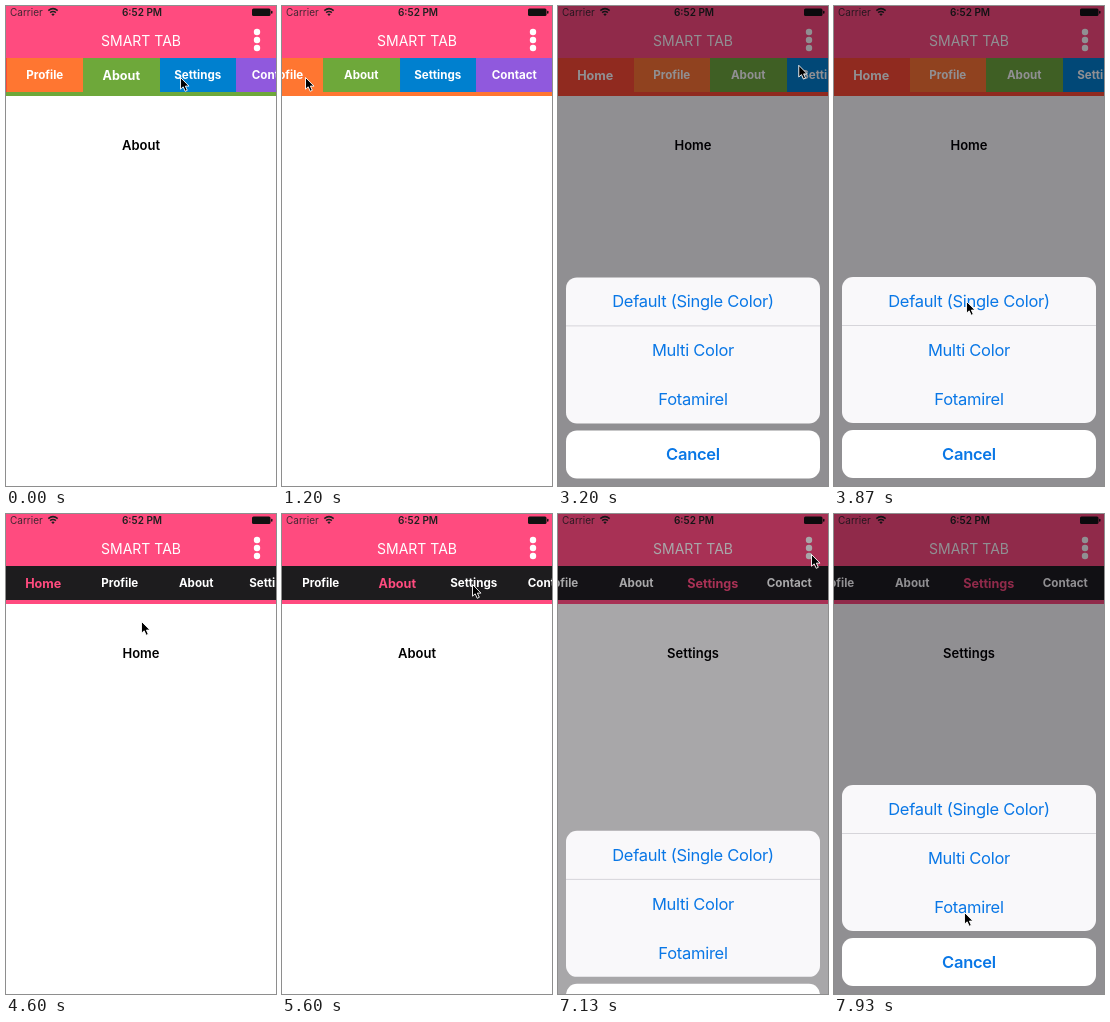
Recreate the animation shown at these times as an HTML page. Size 270 by 480 pixels, loop 8 s.

```html
<!DOCTYPE html>
<html lang="en">
<head>
<meta charset="utf-8">
<title>Smart tab</title>
<style>
  html, body { margin: 0; width: 100%; height: 100%; overflow: hidden; background: #fff; }
  #stage { position: absolute; inset: 0; overflow: hidden; font-family: Inter, Roboto, sans-serif; }
  #stage div, #stage svg { position: absolute; }
  .header { width: 100%; height: 52px; background: #ff4b7f; }
  .title { top: 25px; width: 100%; line-height: 20px; font-size: 14px; color: #fff; text-align: center; }
  .status { top: 0; line-height: 12px; font-size: 10px; color: #202020; white-space: nowrap; }
  .carrier { left: 4px; color: #442733; }
  .clock { width: 100%; left: 1px; font-weight: 600; text-align: center; }
  .strip { top: 52px; width: 100%; height: 38px; overflow: hidden; }
  .tabs { top: 0; left: 0; width: 383px; height: 34px; }
  .tab { top: 0; width: 76.5px; height: 34px; line-height: 35px; font-size: 11.6px; font-weight: 700; color: #fff; text-align: center; }
  .page { top: 129px; width: 100%; line-height: 20px; font-size: 13px; font-weight: 600; color: #000; text-align: center; }
  .dim { inset: 0; background: #040008; }
  .sheet { left: 8px; top: 271px; width: 254px; height: 201px; }
  .group { width: 100%; height: 146px; border-radius: 11px; background: #f9f8fa; }
  .choice { width: 100%; height: 49px; line-height: 49px; font-size: 16.5px; letter-spacing: -.27px; color: #0977e6; text-align: center; }
  .rule { top: 48px; width: 100%; height: 1px; background: #d6d5da; }
  .cancel { top: 153px; width: 100%; height: 48px; line-height: 48px; border-radius: 11px; background: #fff; font-weight: 600; }
  .cursor { left: 0; top: 0; width: 12px; height: 17px; overflow: visible; }
</style>
</head>
<body>
<div id="stage">
  <div class="header"></div>
  <div class="title">SMART TAB</div>
  <div class="status carrier">Carrier</div>
  <div class="status clock">6:52 PM</div>
  <svg width="270" height="52">
    <path d="M42.3 4.6Q47 .6 51.7 4.6M44.1 6.7Q47 4.3 49.9 6.7" fill="none" stroke="#202020" stroke-width="1.5"/>
    <path d="M45.3 8.2Q47 7 48.7 8.2L47 10z" fill="#202020"/>
    <rect x="246" y="2.5" width="18.5" height="7.5" rx="1.5" fill="#111"/>
    <rect x="265" y="4.7" width="1.5" height="3" rx=".7" fill="#111"/>
    <g fill="#fff"><circle cx="251" cy="26" r="3.2"/><circle cx="251" cy="34" r="3.2"/><circle cx="251" cy="42" r="3.2"/></g>
  </svg>
  <div class="strip"><div class="tabs"></div></div>
  <div class="page"></div>
  <div class="dim"></div>
  <div class="sheet">
    <div class="group">
      <div class="choice" style="top:0">Default (Single Color)</div>
      <div class="rule"></div>
      <div class="choice" style="top:49px">Multi Color</div>
      <div class="choice" style="top:98px">Fotamirel</div>
    </div>
    <div class="choice cancel">Cancel</div>
  </div>
  <svg class="cursor" viewBox="0 0 12 17">
    <path d="M.5 .5V12.2L3.2 9.8L5.2 14.3L7.3 13.3L5.4 9.1H9z" fill="#000" stroke="#fff" stroke-width=".9"/>
  </svg>
</div>
<script>
const LOOP = 8000, TAB = 76.5, MIN_SCROLL = 1, MAX_SCROLL = 113;
const PINK = '#ff4b7f', DARK = '#1d1c1e', DIM = .44;
const names = ['Home', 'Profile', 'About', 'Settings', 'Contact'];
const colors = ['#ff4a31', '#ff7631', '#6ea83a', '#0080cf', '#9059dd'];
const SINGLE_FROM = 4300;

// Tab taps: [time, tab]
const taps = [[-1000, 2], [170, 3], [1153, 1], [1900, 0], [4960, 2], [5760, 3]];
// Sheet: [opens, closes]
const sheets = [[2850, 3980], [6970, 9000]];
// Pointer: [time, x, y]
const stops = [
  [0, 174, 71], [400, 174, 71], [1050, 23, 71], [2130, 23, 71], [2700, 253, 31], [3050, 253, 31],
  [3800, 132, 295], [4060, 132, 295], [4330, 134, 190], [4600, 135, 107], [4900, 190, 70],
  [5950, 190, 70], [6500, 253, 40], [7200, 253, 40], [7900, 130, 398], [8000, 130, 398]
];

const $ = s => document.querySelector(s);
const clamp = (v, lo = 0, hi = 1) => Math.min(hi, Math.max(lo, v));
const smooth = v => v * v * (3 - 2 * v);
const easeOut = v => 1 - (1 - v) ** 3;
const mix = (a, b, k) => a + (b - a) * k;
const scrollFor = i => clamp((i - 1) * 76, MIN_SCROLL, MAX_SCROLL);

const strip = $('.strip'), tabs = $('.tabs'), page = $('.page');
const dim = $('.dim'), sheet = $('.sheet'), cursor = $('.cursor');
const labels = names.map((name, i) => {
  const tab = document.createElement('div');
  tab.className = 'tab';
  tab.textContent = name;
  tab.style.left = i * TAB + 'px';
  return tabs.appendChild(tab);
});

function drawTabs(t) {
  const n = taps.findLastIndex(([at]) => at <= t);
  const [at, active] = taps[n];
  const before = n ? taps[n - 1][1] : active;
  const move = smooth(clamp((t - at - 30) / 320));
  const single = t >= SINGLE_FROM;
  tabs.style.transform = `translateX(${-mix(scrollFor(before), scrollFor(active), move)}px)`;
  tabs.style.background = single ? DARK : 'none';
  strip.style.background = single ? PINK : colors[active];
  labels.forEach((label, i) => {
    const on = i === active;
    label.style.background = single ? 'none' : colors[i];
    label.style.color = single && on ? PINK : '#fff';
    label.style.fontSize = (on ? mix(11.6, 12.6, move) : 11.6) + 'px';
  });
  page.textContent = names[active];
  page.style.opacity = clamp((t - at - 60) / 260);
}

function drawSheet(t) {
  const [opens, closes] = sheets.findLast(([at]) => at <= t) || [LOOP, LOOP];
  const shown = easeOut(clamp((t - opens) / 400)) * (1 - smooth(clamp((t - closes) / 320)));
  sheet.style.transform = `translateY(${215 * (1 - shown)}px)`;
  dim.style.opacity = DIM * shown;
}

function drawCursor(t) {
  const n = Math.min(stops.length - 2, stops.findLastIndex(([at]) => at <= t));
  const [t0, x0, y0] = stops[n], [t1, x1, y1] = stops[n + 1];
  const k = smooth(clamp((t - t0) / (t1 - t0)));
  cursor.style.transform = `translate(${mix(x0, x1, k)}px, ${mix(y0, y1, k)}px)`;
}

function draw() {
  const t = performance.now() % LOOP;
  drawTabs(t);
  drawSheet(t);
  drawCursor(t);
  requestAnimationFrame(draw);
}
draw();
</script>
</body>
</html>
```
